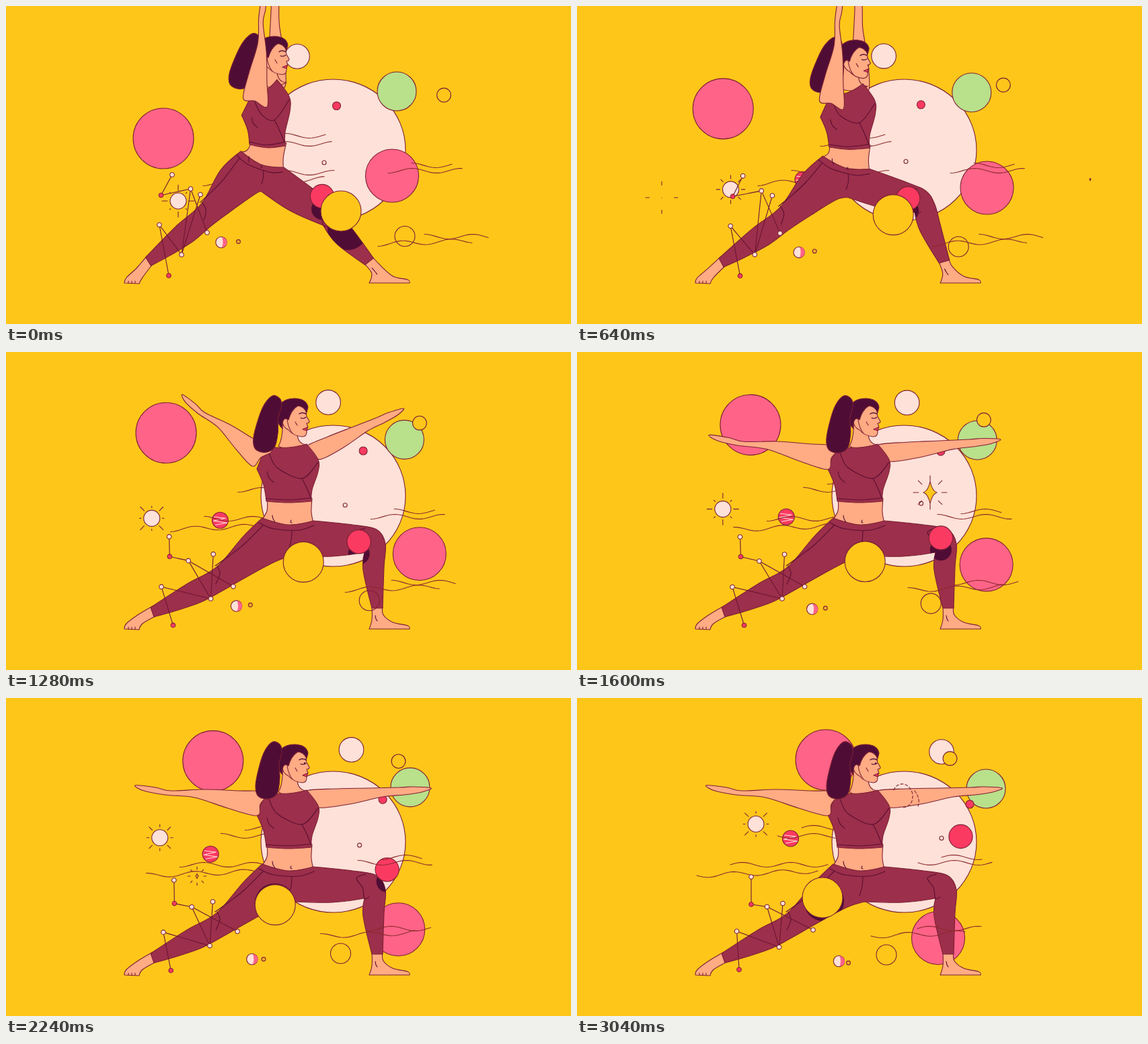
An HTML page for the animation above (3120 ms loop, 840 by 473 pixels).

```html
<!DOCTYPE html>
<html lang="en">
<head>
<meta charset="utf-8">
<title>Warrior pose</title>
<style>
html, body { margin: 0; width: 100%; height: 100%; overflow: hidden; background: #ffc61a; }
svg { display: block; width: 100%; height: 100%; }
</style>
</head>
<body>
<svg id="stage" viewBox="0 0 840 473" fill="none" stroke="#7d2034" stroke-width="1.1" stroke-linecap="round" stroke-linejoin="round"></svg>
<script>
const LOOP = 3120, STEP = 80, END = LOOP - STEP;
const YELLOW = '#ffc61a', PALE = '#fee1d8', PINK = '#ff6388', RED = '#fb3a62', GREEN = '#b9e08a';
const SKIN = '#ffab84', CLOTH = '#9c2f4b', HAIR = '#4f0d35', LINE = '#5b0f33';
const stage = document.getElementById('stage');
const updates = [];

const parse = s => s.split(' ').map(p => p.split(',').map(parseFloat));
const mix = (a, b, k) => a + (b - a) * k;
const mixPoint = (a, b, k) => [mix(a[0], b[0], k), mix(a[1], b[1], k)];
const fmt = p => p.map(v => v.toFixed(1)).join(' ');
const smooth = (from, to, t) => {
  const k = Math.min(1, Math.max(0, (t - from) / (to - from)));
  return k * k * (3 - 2 * k);
};

function add(tag, attrs = {}, parent = stage) {
  const node = document.createElementNS('http://www.w3.org/2000/svg', tag);
  for (const name in attrs) node.setAttribute(name, attrs[name]);
  return parent.appendChild(node);
}
const show = (node, on) => node.setAttribute('visibility', on ? 'visible' : 'hidden');

// Bezier curve of any degree over its control points.
function bezier(pts, s) {
  while (pts.length > 1) pts = pts.slice(1).map((p, i) => mixPoint(pts[i], p, s));
  return pts[0];
}

function ball(r, fill, course, parent = stage) {
  const g = add('g', {}, parent), pts = parse(course);
  add('circle', { r, fill }, g);
  updates.push(t => g.setAttribute('transform', `translate(${fmt(bezier(pts, t / END))})`));
  return g;
}

// Skeleton: every joint eases from the lunge to the wide stance.
const STANCE = 1040;
const joint = (from, to, yPower = 3, xPower = 1.4) => ({ from, to, yPower, xPower });
const joints = {
  head: joint([-30, -24], [0, 0]),
  shL: joint([356, 150], [378, 160]), shR: joint([417, 135], [460, 160]),
  hemL: joint([362, 206], [387, 222]), hemR: joint([415, 208], [454, 222]),
  waL: joint([349, 217], [381, 248]), waR: joint([413, 240], [457, 251]),
  hipL: joint([362, 255], [395, 285]), hipR: joint([400, 265], [445, 280]),
  kneeL: joint([296, 312], [315, 339]), kneeR: joint([485, 314], [549, 283], .8),
  ankL: joint([212, 380], [218, 387]), ankR: joint([540, 380], [552, 381]),
  heelL: joint([198, 412], [198, 412]), toeL: joint([176, 412], [176, 412]),
  heelR: joint([540, 412], [540, 412]), toeR: joint([600, 412], [600, 412]),
  armL: joint([370, 143], [380, 158], 3, .5), armR: joint([402, 125], [456, 150], 3, 2.2)
};
const polar = ([x, y], deg, r) => [x + r * Math.cos(deg * Math.PI / 180), y + r * Math.sin(deg * Math.PI / 180)];
const armsOpen = t => smooth(640, 1700, t);

function poseAt(t) {
  const p = Math.min(1, t / STANCE), pose = {};
  for (const name in joints) {
    const { from, to, xPower, yPower } = joints[name];
    pose[name] = [mix(from[0], to[0], p ** xPower), mix(from[1], to[1], p ** yPower)];
  }
  const left = armsOpen(t), right = left ** .65;
  const reach = (rest, k) => mix(165, rest, k) - 34 * Math.sin(Math.PI * k);
  pose.tipL = polar(pose.armL, mix(-84, -171.5, left), reach(190, left));
  pose.tipR = polar(pose.armR, mix(-91, -5, right), reach(177, right));
  return pose;
}
const rest = poseAt(END);
let pose = rest;

// A point follows nearby bones: it keeps its place along each and its distance from it.
function bind([x, y], bones) {
  const links = bones.map(([a, b]) => {
    const [ax, ay] = rest[a], dx = rest[b][0] - ax, dy = rest[b][1] - ay, len = Math.hypot(dx, dy);
    const u = ((x - ax) * dx + (y - ay) * dy) / len ** 2;
    const v = ((y - ay) * dx - (x - ax) * dy) / len;
    const c = Math.min(1, Math.max(0, u));
    const gap = Math.hypot(x - ax - dx * c, y - ay - dy * c);
    return { a, b, u, v, weight: 1 / (gap ** 2 + 4) ** 2 };
  });
  const total = links.reduce((sum, l) => sum + l.weight, 0);
  return () => links.reduce((p, { a, b, u, v, weight }) => {
    const [ax, ay] = pose[a], dx = pose[b][0] - ax, dy = pose[b][1] - ay, len = Math.hypot(dx, dy);
    const w = weight / total;
    return [p[0] + w * (ax + dx * u - dy / len * v), p[1] + w * (ay + dy * u + dx / len * v)];
  }, [0, 0]);
}

// Spline through points; those marked "!" stay sharp.
function spline(pts, corners, closed) {
  const n = pts.length;
  const get = i => closed ? pts[(i + n) % n] : pts[Math.min(Math.max(i, 0), n - 1)];
  const handle = (i, sign) => {
    const p = get(i), a = get(i - 1), b = get(i + 1);
    return corners[(i + n) % n] ? p : p.map((v, c) => v + sign * (b[c] - a[c]) / 6);
  };
  let d = 'M' + fmt(pts[0]);
  for (let i = 0; i < (closed ? n : n - 1); i++)
    d += 'C' + [handle(i, 1), handle(i + 1, -1), get(i + 1)].map(fmt).join(' ');
  return d + (closed ? 'Z' : '');
}

const bonesOf = s => s.split(' ').map(b => b.split('-'));
const LEGS = bonesOf('waL-waR hipL-kneeL kneeL-ankL hipR-kneeR kneeR-ankR');
const TORSO = bonesOf('shL-hemL shR-hemR');
const BELLY = bonesOf('hemL-waL hemR-waR');

function shape(fill, bones, points, parent = stage) {
  const closed = fill !== 'none';
  const node = add('path', closed ? { fill } : { stroke: LINE }, parent);
  const corners = points.split(' ').map(p => p.endsWith('!'));
  const bound = parse(points).map(p => bind(p, bones));
  updates.push(() => node.setAttribute('d', spline(bound.map(place => place()), corners, closed)));
}
const crease = (bones, points) => shape('none', bones, points);

// Wavy line drifting left while it ripples.
function wave(x, y, length, drift, phase = 0, tilt = 0) {
  const node = add('path', { stroke: '#8a2a2c' });
  updates.push(t => {
    const pts = [];
    for (let u = 0; u <= length; u += 5)
      pts.push(fmt([x + u - drift * t / END, y + tilt * u / length + 3.5 * Math.cos(u * Math.PI / 36 + phase + t * Math.PI / 320)]));
    node.setAttribute('d', 'M' + pts.join('L'));
  });
}

// Evenly spread rays; inner and outer radius may depend on the ray's index.
function burst(count, inner, outer) {
  let d = '';
  for (let i = 0; i < count; i++) {
    const a = 360 / count * i;
    d += `M${fmt(polar([0, 0], a, inner))}L${fmt(polar([0, 0], a, outer(i)))}`;
  }
  return d;
}

function sparkle(x, y, start, size) {
  const g = add('g', { transform: `translate(${x} ${y})` });
  const star = add('path', {}, g), rays = add('path', {}, g);
  updates.push(t => {
    const age = (t - start) / 640;
    show(g, age > 0 && age < 1);
    const r = Math.max(0, 15 * size * Math.sin(Math.PI * Math.min(1, age / .75))), w = r * .6, c = r * .17;
    star.setAttribute('fill', age < .2 ? PALE : YELLOW);
    star.setAttribute('d', `M0 ${-r}Q${c} ${-c} ${w} 0Q${c} ${c} 0 ${r}Q${-c} ${c} ${-w} 0Q${-c} ${-c} 0 ${-r}Z`);
    const from = (9 + 18 * age) * size;
    rays.setAttribute('d', age > .25 ? burst(age < .65 ? 8 : 4, from, () => from + 7 * size) : '');
  });
}

// Backdrop
add('ellipse', { cx: 486.5, cy: 214, rx: 107.5, ry: 105, fill: PALE });
ball(45, PINK, '234,197 170,118 302,82 370,92');
ball(39.5, PINK, '574,252.5 658,266 600,364 537,357');
ball(29, GREEN, '581,127 608,135');
ball(18.3, PALE, '433,75 488,73 542,80');
ball(10.4, YELLOW, '651,132.5 612,93 554.5,90');
ball(6, RED, '491.5,148.5 539,142 584,158');
ball(3, PALE, '473,233 512,231 542,208.5');
const striped = ball(12, RED, '352,264 331,256 280,244 317.5,209');
add('path', { stroke: PALE, d: 'M-9 -5L8 -3L-10 1L10 4L-7 7' }, striped);

const sun = ball(12, PALE, '256,290 200,273 203,200 266,187.5');
const sunRays = add('path', {}, sun);
updates.push(t => {
  const pulse = 3 * Math.cos(2 * Math.PI * t / 840);
  sunRays.setAttribute('d', burst(8, 16, i => 21 + (i % 2 ? -pulse : pulse)));
});

wave(343, 248, 146, 115, Math.PI);
wave(293, 264, 183, 115, 0, -7);
wave(415, 193, 61, 81, Math.PI);
wave(379, 205, 107, 81);

// Figure
const head = add('g');
const ponytails = [];
function ponytail() {
  const g = add('g');
  add('path', { fill: HAIR, d: spline(parse('408,70 397,65 385,78 377,100 371,130 375,146 390,150 403,142 407,120 406,98 410,82'), [], true) }, g);
  updates.push(t => {
    g.setAttribute('transform', `translate(${fmt(pose.head)}) rotate(${9 * (1 - armsOpen(t))} 400 70)`);
  });
  ponytails.push(g);
}
ponytail();
shape(SKIN, bonesOf('armR-tipR'), '447,138 490,135 540,134 585,133 605,132 632,134 618,140 592,144 560,147 510,158 465,163 455,150');
shape(SKIN, BELLY, '388,218! 388,236 380,250! 420,260 457,254! 454,238 455,218!');
shape(SKIN, bonesOf('kneeL-ankL toeL-heelL'), '218,378! 196,391 179,404 176,412! 198,413! 203,404 222,393!');
add('path', { d: 'M182 412v-3M187 412v-3M192 412v-3' });
shape(SKIN, bonesOf('kneeR-ankR heelR-toeR'), '544,378! 544,398 540,412! 600,412! 597,407 575,402 561,391 560,378!');
crease(bonesOf('kneeR-ankR heelR-toeR'), '549,392 550,397 552,400');

const trousers = '381,247! 352,275 313,320 269,345 215,380! 220,394! 252,385 290,372 322,355 357,335 400,312 427,303! 485,304 533,298! 531,325 544,381! 560,381! 562,320 564,285 551,264 515,257 457,251! 420,257';
shape(CLOTH, LEGS, trousers);
shape(CLOTH, LEGS, trousers, add('clipPath', { id: 'legs' }));
const shade = add('g', { 'clip-path': 'url(#legs)', stroke: 'none' });
ball(16, HAIR, '470,302 491,310 594,304 570.5,224', shade);
ball(30, HAIR, '508,333 426,306 367,302', shade);

crease(LEGS, '376,254 398,263 435,265 458,258');
crease(LEGS, '382,258 355,285 332,303 311,318');
crease(LEGS, '314,318 318,330 312,345');
crease(LEGS, '425,266 424,280 420,294');
crease(LEGS, '534,262 521,268 530,282 533,298 540,296');
crease(BELLY, '424,250 423,253 425,254');
crease(BELLY, '396,243 397,248 400,253');

stage.append(head);
add('path', { fill: SKIN, d: 'M411 104Q412 128 405 140Q422 150 447 138Q434 137 433 122Z' }, head);
add('path', { fill: SKIN, d: 'M412 92L430 78L446 84Q446 93 447 96L451 103Q451 106 447 106L449 112L447 115L447 119Q447 126 440 126Q428 125 420 116Q411 112 410 100Z' }, head);
add('path', { fill: HAIR, d: 'M411 114Q397 100 404 82Q412 69 430 69Q447 70 449 82L447 90Q442 80 434 80Q424 86 420 101L416 99Q410 100 411 114Z' }, head);
add('path', { d: 'M418 101Q420 114 426 121M430 104L433 109' }, head);
add('path', { stroke: HAIR, 'stroke-width': 1.5, d: 'M436 92Q440 89 446 92' }, head);
add('path', { stroke: HAIR, d: 'M438 98Q442 100 446 97' }, head);
const openEye = add('circle', { cx: 444, cy: 97, r: 1.2, fill: HAIR, stroke: 'none' }, head);
add('path', { fill: RED, d: 'M441 115L448 112L447 117Z' }, head);

shape(CLOTH, TORSO, '386,141! 373,174! 383,198 387,222! 420,224 454,222! 455,205 464,178 464,160 447,137! 420,142');
crease(TORSO, '391,150 403,172 440,188 464,164');
crease(TORSO, '440,188 447,202 453,217');
crease(TORSO, '388,178 391,187 398,194');
crease(TORSO, '387,218 420,220 454,217');
shape(SKIN, bonesOf('armL-tipL'), '388,140 345,138 295,136 245,138 222,133 192,130 205,138 236,144 280,148 330,164 373,175 378,158');
ponytail();

// Constellation: settles with the stance, then drifts on.
const nodes = {
  A: '247,251 242.5,275 259,266', B: '230.5,281.5 243.5,304.5 259,307',
  C: '274.5,272 271,311 282.5,310.5', D: '289,280.5 308.5,301 306,305.5',
  E: '299,337 338.5,349 351,345', F: '261,370 305,367 300.5,370.5',
  G: '228,325.5 231,349.5 237.5,347', H: '242,401 248.5,406.5 241,404'
};
const links = add('path', { stroke: '#6d1733' });
const stars = Object.entries(nodes).map(([name, course]) => ({
  name, course: parse(course),
  dot: add('circle', { r: 3.3, fill: 'BH'.includes(name) ? RED : PALE })
}));
updates.push(t => {
  const place = {};
  for (const { name, course: [a, b, c], dot } of stars) {
    const p = mixPoint(mixPoint(a, b, smooth(500, 1340, t)), c, Math.max(0, (t - 1600) / (END - 1600)));
    dot.setAttribute('transform', `translate(${fmt(p)})`);
    place[name] = fmt(p);
  }
  links.setAttribute('d', 'AB BC CF DF CE GF GH'.split(' ').map(([a, b]) => `M${place[a]}L${place[b]}`).join(''));
});

// Foreground
ball(17.6, RED, '470,283 491,292 594,287 570.5,206');
ball(30, YELLOW, '498,305 432,323 365,297');
ball(15, 'none', '593,342.5 533,384 460,382');
const halved = ball(8.2, PALE, '320,351.5 341,391 389.5,391.5');
add('path', { fill: PINK, stroke: 'none', d: 'M1 -7.6A7.6 7.6 0 0 1 1 7.6Q4 0 1 -7.6Z' }, halved);
ball(2.9, '#ffb02a', '345.5,350.5 361,387.5 403.5,394');

wave(603, 237, 60, 61, Math.PI);
wave(568, 245, 110, 61);
wave(622, 343, 99, 116, Math.PI);
wave(553, 354, 141, 116, 0, -5);

sparkle(126, 285, 80, .75);
sparkle(763, 258, 600, .5);
sparkle(525, 209, 1360, 1.1);
sparkle(284, 265, 1840, .5);

const arcs = add('path', { 'stroke-dasharray': '4 3' });
const dots = add('g');
add('circle', { cx: 500, cy: 150.5, r: 2.6, fill: PALE }, dots);
add('circle', { cx: 508.5, cy: 150.5, r: 2.6, fill: CLOTH }, dots);
updates.push(t => {
  head.setAttribute('transform', `translate(${fmt(pose.head)})`);
  show(ponytails[0], t < 1280);
  show(ponytails[1], t >= 1280);
  show(openEye, t >= 1760);
  show(arcs, t >= 2400);
  arcs.setAttribute('d', t < 2720
    ? 'M471 137C476 124 494 124 498 144M501 135Q507 138 508 146'
    : 'M471 137C476 124 494 124 499 143C500 156 494 163 482 163M502 138Q511 150 507 161');
  show(dots, t >= 2400 && t < 2720);
});

const origin = performance.now();
function frame() {
  const t = Math.floor((performance.now() - origin) % LOOP / STEP) * STEP;
  pose = poseAt(t);
  updates.forEach(update => update(t));
  requestAnimationFrame(frame);
}
frame();
</script>
</body>
</html>
```
